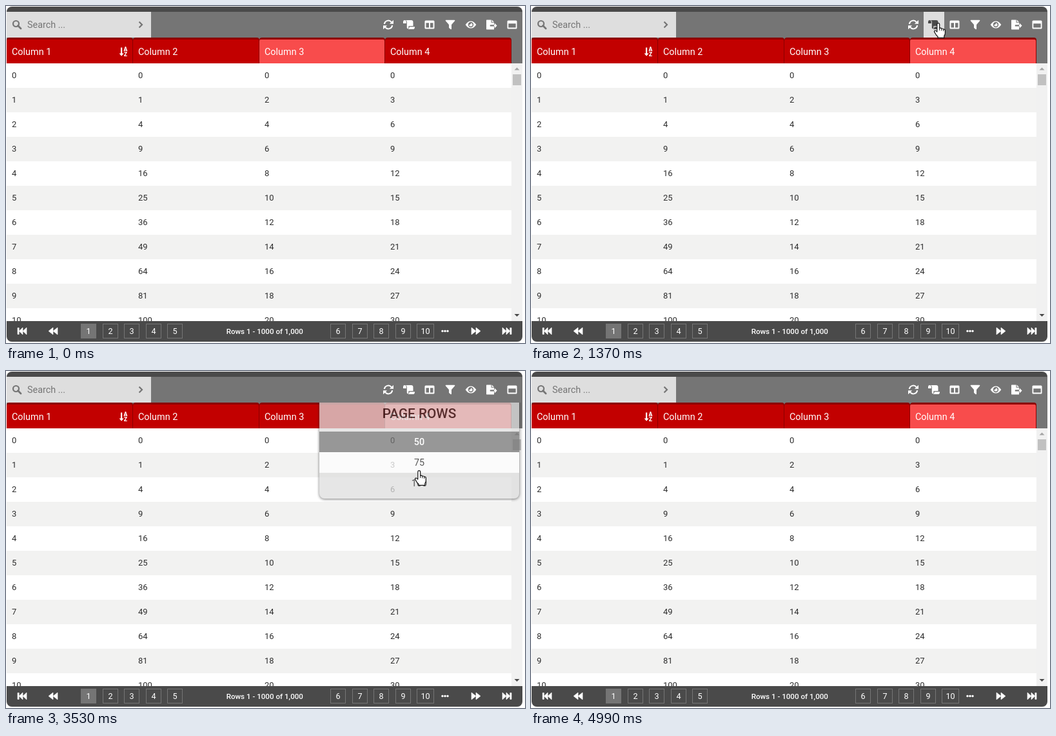
Write an HTML page that moves like this. It is 805 by 523 pixels and loops after 5.22 s.

```html
<!DOCTYPE html>
<html lang="en">
<head>
<meta charset="utf-8">
<title>Data grid</title>
<style>
html, body { margin: 0; width: 100%; height: 100%; overflow: hidden; background: #fff; }
svg { display: block; width: 100vw; height: 100vh; font-family: Roboto, sans-serif; }
</style>
</head>
<body>
<svg id="stage" viewBox="0 0 805 523" xmlns="http://www.w3.org/2000/svg"></svg>
<script>
const LOOP = 5220;
const DARK = '#4a4a4a', GREY = '#757575', PALE = '#dedede';
const RED = '#c20000', LIT = '#f84c4c', EDGE = '#8c0000', INK = '#2d2d2d';
const COLS = [1, 197, 393, 588, 784];
const TOP = 89, ROW = 38;
const stage = document.getElementById('stage');

function el(parent, tag, attrs, text) {
  const node = document.createElementNS(stage.namespaceURI, tag);
  for (const key in attrs) node.setAttribute(key, attrs[key]);
  if (text !== undefined) node.textContent = text;
  parent.appendChild(node);
  return node;
}
const set = (node, key, value) => node.setAttribute(key, value);
const group = (parent, attrs) => el(parent, 'g', attrs || {});
const rect = (parent, x, y, width, height, fill, more) =>
  el(parent, 'rect', { x, y, width, height, fill, ...more });
const path = (parent, d, fill, more) => el(parent, 'path', { d, fill, ...more });
const label = (parent, x, y, size, fill, text, more) =>
  el(parent, 'text', { x, y, 'font-size': size, fill, ...more }, text);
const MID = { 'text-anchor': 'middle' };

const defs = el(stage, 'defs', {});
const clip = (id, x, y, w, h) =>
  rect(el(defs, 'clipPath', { id }), x, y, w, h, '#000');
clip('body', 1, TOP, 783, 400);
clip('drop', 470, 49, 335, 200);

// Frame and search box
path(stage, 'M1 9A8 8 0 0 1 9 1H793A8 8 0 0 1 801 9Z', DARK);
rect(stage, 1, 9, 800, 80, GREY);
rect(stage, 1, 9, 224, 40, PALE);
el(stage, 'circle', { cx: 15.5, cy: 27.5, r: 4.5, fill: 'none', stroke: GREY, 'stroke-width': 2.2 });
path(stage, 'M18.5 30.5L23 35', 'none', { stroke: GREY, 'stroke-width': 2.8, 'stroke-linecap': 'round' });
label(stage, 33, 34, 14.4, GREY, 'Search ...');
path(stage, 'M206.5 24.5L211 29L206.5 33.5', 'none', { stroke: GREY, 'stroke-width': 2.2 });

// Toolbar
const ICONS = [
  'M8-7.3V-1.2H1.9ZM-8 7.3V1.2H-1.9ZM-7.2-1A7.2 7.2 0 0 1 5.5-4.8L4-3.3A5 5 0 0 0-5-1ZM7.2 1A7.2 7.2 0 0 1-5.5 4.8L-4 3.3A5 5 0 0 0 5 1Z',
  'M-9-4.6A2.4 2.4 0 0 1-4.2-4.6V-2H-9ZM-5-7H3.5A3 3 0 0 1 6.5-4V2H-.6V4.8A1.3 1.3 0 0 1-3.2 4.8V-4.6Q-3.2-6-5-7ZM.6 3.2H9V4.2A3 3 0 0 1 6 7H-2Q.6 6.6 .6 4.6Z',
  'M-6-6.5H6Q7.5-6.5 7.5-5V5Q7.5 6.5 6 6.5H-6Q-7.5 6.5-7.5 5V-5Q-7.5-6.5-6-6.5ZM-5.5-2.8V4.5H-1V-2.8ZM1-2.8V4.5H5.5V-2.8Z',
  'M-6.6-7.3H6.6Q8-7 7-5.7L2 0V6.6Q1.6 7.8 .6 7L-1.6 5.2Q-2 4.9-2 4.2V0L-7-5.7Q-8-7-6.6-7.3Z',
  'M-8.3 0Q-5-5.6 0-5.6T8.3 0Q5 5.6 0 5.6T-8.3 0ZM-4.2 0A4.2 4.2 0 0 0 4.2 0A4.2 4.2 0 0 0-4.2 0ZM-2.6 0A2.6 2.6 0 0 0 2.6 0A2.6 2.6 0 0 0 0-2.6Q.2-.4-2.6 0Z',
  'M-7.3-7.5H-.5V-3.2H4V.2H-2.2V2.6H4V7.5H-7.3Q-8 7.5-8 6.7V-6.7Q-8-7.5-7.3-7.5ZM.5-7.5L4-4.2H.5ZM4.8-2.6L8.6 1.4L4.8 5.4V2.6H4V.2H4.8Z',
  'M-6-6.5H6Q7.5-6.5 7.5-5V5Q7.5 6.5 6 6.5H-6Q-7.5 6.5-7.5 5V-5Q-7.5-6.5-6-6.5ZM-5.7-1.8V4.4H5.7V-1.8Z'
];
const tools = ICONS.map((d, i) => ({
  back: rect(stage, 577 + 32 * i, 9, 32, 40, PALE),
  icon: path(stage, d, '#fff', { 'fill-rule': 'evenodd', transform: `translate(${593 + 32 * i} 29)` })
}));

// Column headers
const heads = COLS.slice(0, 4).map((x, i) => {
  const w = COLS[i + 1] - x;
  const tab = (y, r, width, fill) => path(stage,
    `M${x} 89V${y + r}a${r} ${r} 0 0 1 ${r} ${-r}H${x + width - r}a${r} ${r} 0 0 1 ${r} ${r}V89Z`, fill);
  tab(49, 4, w, EDGE);
  const face = tab(52, 2, w - 1, RED);
  label(stage, x + 8, 76, 14.4, '#fff', 'Column ' + (i + 1));
  return face;
});
path(stage, 'M178 64.5H180.2V73.5H182.6L179.1 77.8L175.6 73.5H178Z', '#fff');
label(stage, 185.4, 70, 8.6, '#fff', 'A', { ...MID, 'font-weight': 900 });
label(stage, 185.4, 77.6, 8.6, '#fff', 'Z', { ...MID, 'font-weight': 900 });

// Rows
const table = group(stage, { 'clip-path': 'url(#body)' });
const rows = [];
for (let i = 0; i <= 10; i++) {
  const y = TOP + ROW * i;
  const text = group(table);
  const back = rect(text, 1, y, 783, ROW, '#fff');
  const cells = group(text);
  [i, i * i, 2 * i, 3 * i].forEach((n, c) =>
    el(cells, 'text', { x: COLS[c] + 8, y: y + 23, 'font-size': 13 }, n));
  rows.push({ back, cells });
}

// Scrollbar
rect(stage, 784, 89, 17, 400, '#f1f1f1');
rect(stage, 786, 106, 13, 17, '#c1c1c1');
path(stage, 'M788.5 99.5H796.5L792.5 95.5Z', '#a3a3a3');
path(stage, 'M788.5 478H796.5L792.5 482Z', '#484848');

// Footer
path(stage, 'M1 489H801V513A8 8 0 0 1 793 521H9A8 8 0 0 1 1 513Z', DARK);
const lastHover = path(stage, 'M753 489H801V513A8 8 0 0 1 793 521H753Z', GREY);
const arrows = 'M7-5.5V5.5L0 0ZM14-5.5V5.5L7 0Z';
const ends = 'M0-5H2.2V5H0ZM8-5.5V5.5L2.2 0ZM14-5.5V5.5L8 0Z';
const nav = (d, x, dir) => path(stage, d, '#fff', {
  transform: `translate(${x} 504.5) scale(${dir} 1)`, stroke: '#fff', 'stroke-width': .6, 'stroke-linejoin': 'round'
});
nav(ends, 18, 1);
nav(arrows, 66, 1);
nav(arrows, 736, -1);
nav(ends, 784, -1);
for (let n = 1; n <= 10; n++) {
  const x = n < 6 ? 116.5 + 33.5 * (n - 1) : 503.5 + 33.6 * (n - 6);
  const w = n < 10 ? 23 : 26;
  rect(stage, Math.floor(x) + .5, 493.5, w, 22, n === 1 ? GREY : 'none', { stroke: GREY });
  label(stage, Math.floor(x) + .5 + w / 2, 509, 12.6, '#fff', n, MID);
}
label(stage, 401.3, 508.8, 11.6, '#fff', 'Rows 1 - 1000 of 1,000', { ...MID, 'font-weight': 500 });
for (const x of [677, 681, 685]) el(stage, 'circle', { cx: x, cy: 504.5, r: 1.7, fill: '#fff' });

// Drop-down
const drop = group(group(stage, { 'clip-path': 'url(#drop)' }));
path(drop, 'M486 45H796V202A8 8 0 0 1 788 210H494A8 8 0 0 1 486 202Z', PALE,
  { style: 'filter:drop-shadow(0 1px 2px rgba(0,0,0,.7))' });
label(drop, 641, 85, 20.8, '#222', 'PAGE ROWS', { ...MID, 'font-weight': 500 });
const items = [50, 75, 100].map((n, i) => {
  const back = rect(drop, 486, 106 + 32 * i, 310, 32, i ? PALE : GREY);
  label(drop, 641, 127 + 32 * i, 14.4, i ? '#222' : '#fff', n, { ...MID, 'font-weight': i ? 400 : 500 });
  return back;
});

// Hand pointer, its tip at 0,0
const hand = group(stage);
path(hand, 'M-2.2 2.4Q-2.2.6-.3.6T1.7 2.4V8.4Q4-.2+7.6 4.8 9.2Q7 8.5 7.8 10.2Q10.4 9.7 10.4 12.4V16Q10.4 18.6 8.8 20.4V23.4H-1V21.4Q-3.4 19.6-5 16.4Q-7.2 13.6-6.2 12.6Q-4.6 11.2-2.2 14Z'
  .replace('Q4-.2+7.6', 'Q4 7.6'), '#fff', { stroke: '#111', 'stroke-width': 1.2, 'stroke-linejoin': 'round' });
path(hand, 'M1.7 8.4V12M4.8 9.2V12.4M7.8 10.2V13', 'none', { stroke: '#111', 'stroke-width': 1 });

// Number of the step reached in a run of n evenly spaced changes from a to b
function step(t, a, b, n) {
  if (t < a) return 0;
  if (n < 2) return 1;
  return Math.min(n, 1 + Math.floor((t - a + 8) * (n - 1) / (b - a)));
}
const easeOut = p => u => 1 - (1 - u) ** p;
const easeIn = p => u => u ** p;
const smooth = u => u * u * (3 - 2 * u);

// Pointer moves: start, end, steps, easing, bend, goal
const START = [765, 466];
const MOVES = [
  [70, 520, 7, u => u, [715, 300], [664, 151]],
  [600, 1060, 7, easeOut(1.6), [659.5, 99.5], [655, 48]],
  [1140, 1520, 6, easeOut(2.5), [642.5, 36], [630, 24]],
  [2440, 2900, 7, smooth, [635.5, 87.5], [641, 151]],
  [2980, 2980, 1, u => u, [641, 152], [641, 154]],
  [4300, 4760, 7, easeIn(1.42), [641, 300], [772, 500]],
  [4840, 4910, 2, u => u, [775, 507], [778, 514]]
];
function pointer(t) {
  let from = START, pos = START;
  for (const [a, b, n, ease, bend, goal] of MOVES) {
    if (t < a) break;
    const u = ease(step(t, a, b, n) / n), v = 1 - u;
    pos = from.map((p, i) => v * v * p + 2 * u * v * bend[i] + u * u * goal[i]);
    from = goal;
  }
  return pos;
}

function draw(t) {
  const [x, y] = pointer(t);
  const shown = t >= 70 && t < 4985;
  const menu = t >= 1900 && t < 3840;
  const held = t >= 1670 && t < 3360;

  set(hand, 'transform', `translate(${Math.round(x)} ${Math.round(y)})`);
  set(hand, 'visibility', shown ? 'visible' : 'hidden');

  const column = t < 70 ? 2 : 3;
  heads.forEach((face, i) => set(face, 'fill', i === column ? LIT : RED));

  const over = shown && !menu && y >= TOP && y < 489 ? Math.floor((y - TOP) / ROW) : -1;
  rows.forEach(({ back, cells }, i) => {
    set(back, 'fill', i === over ? LIT : i % 2 ? '#f2f2f1' : '#fff');
    set(cells, 'fill', i === over ? '#fff' : INK);
    set(cells, 'font-weight', i === over ? 500 : 400);
  });

  const tool = held ? 1 : shown && y < 49 ? Math.floor((x - 577) / 32) : -1;
  tools.forEach(({ back, icon }, i) => {
    set(back, 'visibility', i === tool ? 'visible' : 'hidden');
    set(icon, 'fill', i !== tool ? '#fff' : held ? RED : DARK);
  });

  const open = t < 3500
    ? step(t, 1900, 2210, 5) / 5
    : Math.max(0, 1 - step(t, 3530, 3840, 5) / 4);
  set(drop, 'opacity', open);
  set(drop, 'transform', `translate(0 ${-48 * (1 - open)})`);
  set(items[1], 'fill', menu && y >= 138 ? '#fff' : PALE);

  set(lastHover, 'visibility', shown && y >= 489 ? 'visible' : 'hidden');
}

const begin = performance.now();
function tick() {
  draw((performance.now() - begin) % LOOP);
  requestAnimationFrame(tick);
}
draw(0);
tick();
</script>
</body>
</html>
```
